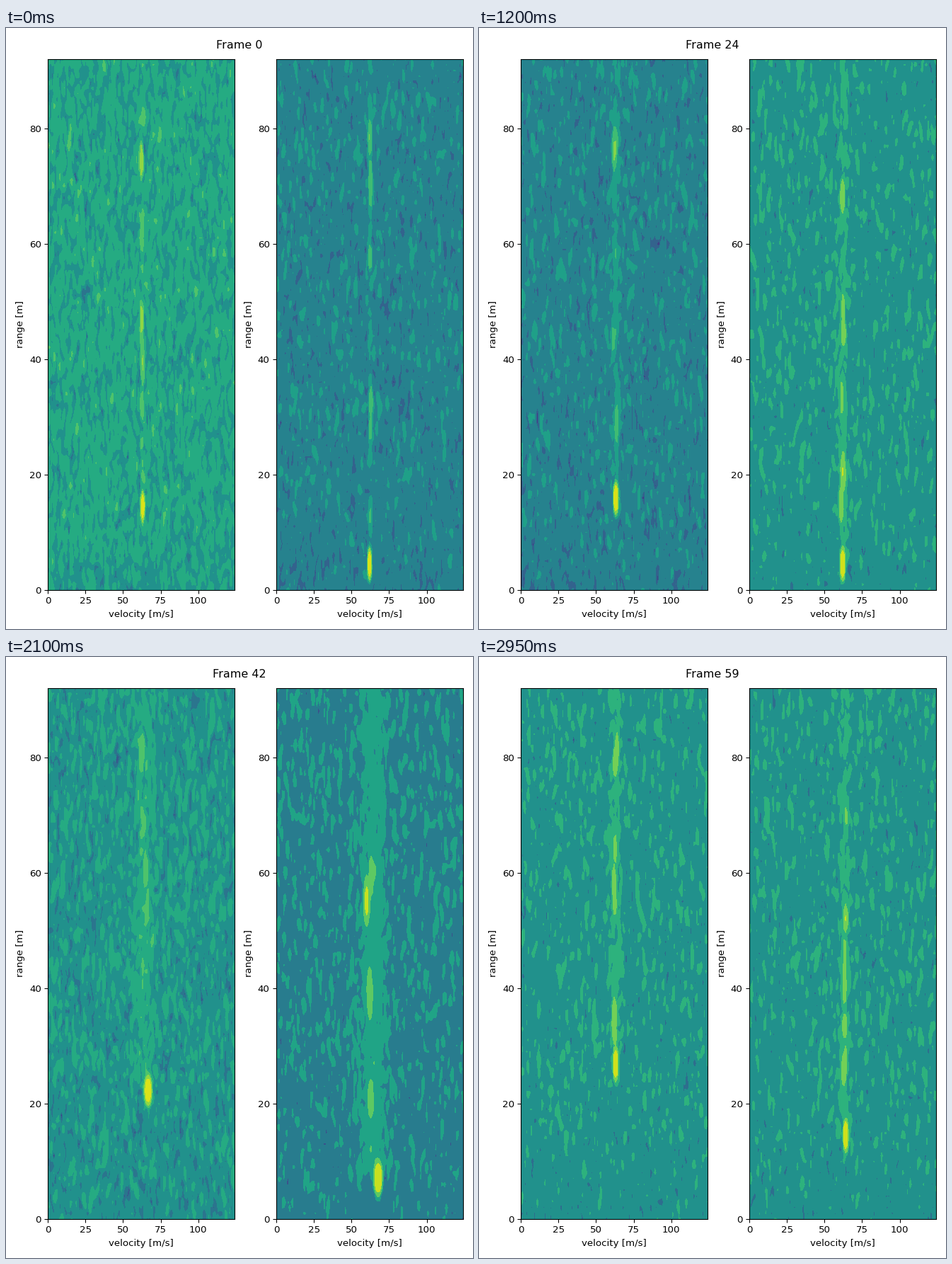
Animation, 660 px wide and 849 px high, one loop 3000 ms. Source, as a matplotlib script:

```python
import numpy as np
import matplotlib.pyplot as plt
from matplotlib.animation import FuncAnimation

W, H, DPI = 660, 849, 96
FRAMES, INTERVAL = 60, 50
COLS, ROWS = 125, 93

plt.rcParams["font.family"] = "DejaVu Sans"
VEL, RNG = np.meshgrid(np.arange(COLS), np.arange(ROWS))

# Autoscaling at a few key times: number of colour layers, and the layer
# coordinate at which the mean noise level sits.
TIMES = [0, 7, 16, 24, 37, 47, 59]
LEFT_SCALE = [(9, 5.3), (8, 5.7), (8, 5.7), (8, 3.7), (7, 3.8), (9, 4.8), (7, 3.8)]
RIGHT_SCALE = [(8, 3.7), (9, 5.3), (9, 4.7), (7, 3.8), (6, 2.9), (7, 2.8), (7, 3.8)]


def hump(t, mid, width):
    return np.exp(-((t - mid) / width) ** 2)


def ease(x):
    x = np.clip(x, 0, 1)
    return x * x * (3 - 2 * x)


def left_target(t):
    """Velocity and range of the strongest echo."""
    return 63 + 6 * hump(t, 37, 7), 14.5 + 12.5 * ease((t - 14) / 48)


def right_target(t):
    return 62 + 7 * hump(t, 47, 11), 4.5 + 10 * np.clip((t - 24) / 35, 0, 1) ** 2


def noise(rng):
    """Receiver noise in dB, correlated as by a Hann window on both axes."""
    n = rng.normal(size=(2, ROWS + 2, COLS + 2))
    n = n[0] + 1j * n[1]
    n = n[:-2] / 2 + n[1:-1] + n[2:] / 2
    n = n[:, :-2] / 2 + n[:, 1:-1] + n[:, 2:] / 2
    return 10 * np.log10(np.abs(n) ** 2 / 4.5 + 1e-6)


def echo(v, r, sv, sr, peak):
    q = ((VEL - v) / sv) ** 2 + ((RNG - r) / sr) ** 2
    return 10 ** (peak / 10) * np.exp(-q ** 2)


def pick_scale(t, scale, rng):
    """Scale of one of the two neighbouring key times, the nearer more often."""
    place = np.interp(t, TIMES, range(len(TIMES)))
    return scale[int(place + rng.random())]


def scan(t, target, scale, rng):
    """Range-velocity map in units of colour layers, and the layer count."""
    layers, floor = pick_scale(t, scale, rng)
    width = 8.7 * (9 / layers) ** 2
    v, r = target(t)
    spread = .8 + 4.5 * hump(t, 42, 16)
    mid = 62.5 + .3 * (v - 62.5)

    rise = np.clip((RNG - r) / 2, 0, 1) * (1 - .35 * RNG / ROWS)
    trail = width * (.65 + .06 * spread) * rise * np.exp(-.5 * ((VEL - mid) / spread) ** 2)
    z = noise(rng) + trail + .4 - 3 * np.exp(-RNG / 8)

    power = 10 ** (z / 10)
    power += echo(v, r, .8 + .2 * spread, 2, width * (layers - .35 - floor))
    for _ in range(7):
        power += echo(rng.normal(mid, .4 * spread), rng.uniform(r + 3, 85),
                      .9 + .1 * spread, rng.uniform(1.5, 3.5),
                      width * rng.uniform(.9, 2.3))

    layer = floor + 10 * np.log10(power) / width
    return np.clip(layer, .001, layers - .001), layers


fig, axes = plt.subplots(1, 2, figsize=(W / DPI, H / DPI), dpi=DPI, facecolor="white")
title = fig.suptitle("Frame 0", fontsize=12)
for ax in axes:
    ax.set(xlim=(0, COLS - 1), ylim=(0, ROWS - 1),
           xticks=range(0, 101, 25), yticks=range(0, 81, 20),
           xlabel="velocity [m/s]", ylabel="range [m]")
fig.tight_layout()

panels = [(axes[0], left_target, LEFT_SCALE), (axes[1], right_target, RIGHT_SCALE)]
drawn = []


def update(t):
    while drawn:
        drawn.pop().remove()
    title.set_text(f"Frame {t}")
    for side, (ax, target, scale) in enumerate(panels):
        z, layers = scan(t, target, scale, np.random.default_rng(100 * side + t))
        colors = plt.cm.viridis((np.arange(layers) + .5) / layers)
        drawn.append(ax.contourf(VEL, RNG, z, levels=np.arange(layers + 1), colors=colors))
    return drawn


anim = FuncAnimation(fig, update, frames=FRAMES, interval=INTERVAL,
                     init_func=lambda: [], repeat=True, repeat_delay=0)
plt.show()
```
